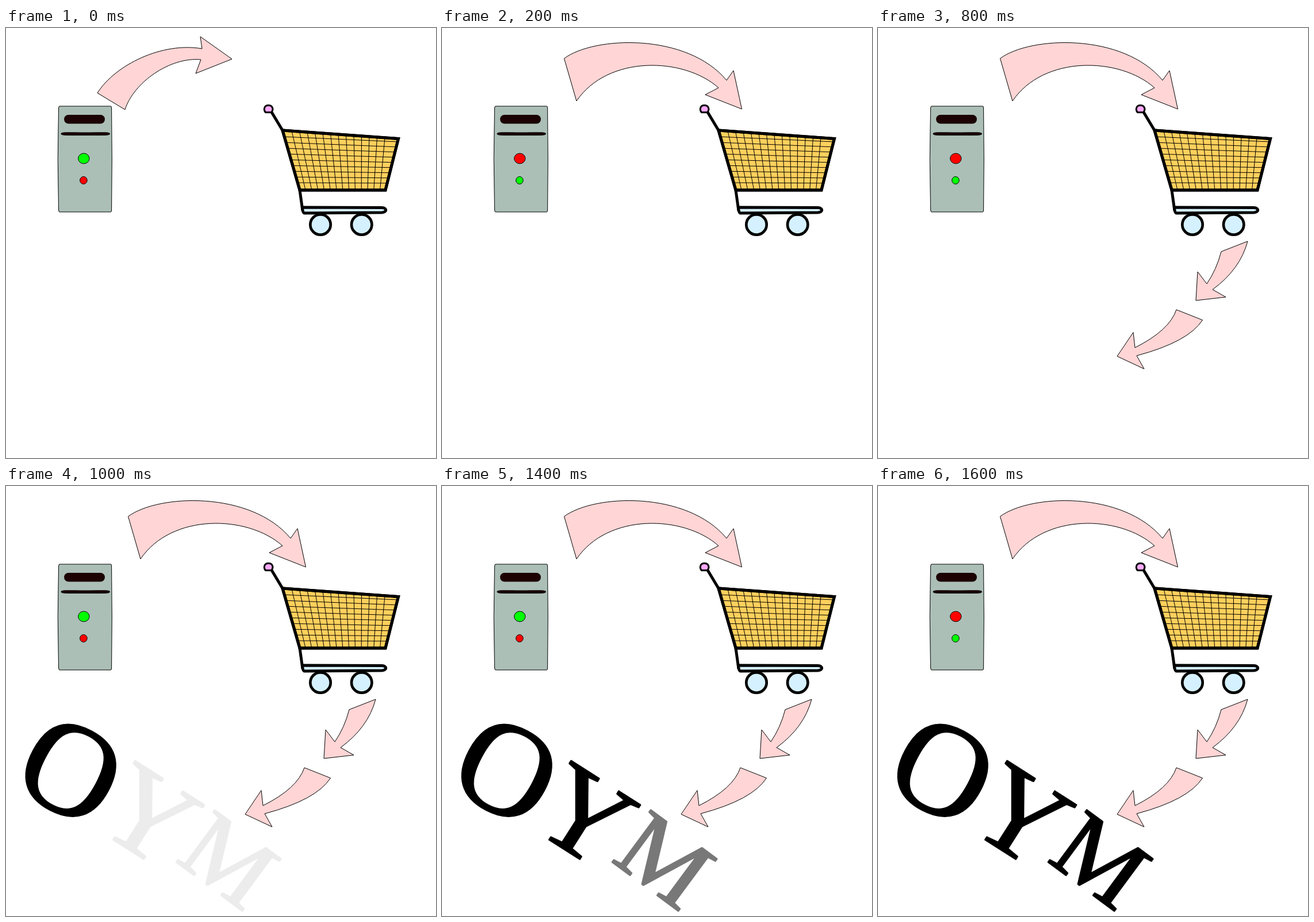
Recreate the animation shown at these times as an HTML page with a canvas. Size 748 by 748 pixels, loop 1800 ms.

```html
<!DOCTYPE html>
<html lang="en">
<head>
<meta charset="utf-8">
<title>Server, cart and letters</title>
<style>
html, body { margin: 0; width: 100%; height: 100%; overflow: hidden; background: #fff; }
canvas { display: block; }
</style>
</head>
<body>
<canvas id="stage" width="748" height="748"></canvas>
<script>
const ctx = document.getElementById('stage').getContext('2d');
const LOOP = 1800;
const PINK = '#ffd5d5', ICE = '#d5f1ff', RED = '#ff0000', GREEN = '#00ff00';
const GHOST = '#ececec', GREY = '#787878', BLACK = '#000';

const ARROWS = {
  rise: 'M159 113C190 64 272 24 341 36L338 15 393 54 330 79 339 55C285 50 222 95 207 142Z',
  toCart: 'M212.5 53C265 14 426 8 495 91L507 74 521.5 141 458 116 481 104C420 50 288 47 234 127Z',
  down: 'M643 371L597 389Q589 420 572 445L556 424 553 474 605 468 582 455Q630 420 643 371Z',
  left: 'M519 490L564.5 508Q540 546 450 570L463 593 416 571 444 529.5 447 556Q507 526 519 490Z'
};

// One letter per place: ink centre, tilt in degrees, font size
const LETTERS = [
  { char: 'O', x: 113, y: 494, tilt: 28, size: 230 },
  { char: 'Y', x: 248, y: 574, tilt: 32.5, size: 208 },
  { char: 'M', x: 387, y: 651, tilt: 36.5, size: 172 }
];

function shape(d, fill, width = 1) {
  const path = new Path2D(d);
  if (fill) {
    ctx.fillStyle = fill;
    ctx.fill(path);
  }
  ctx.lineWidth = width;
  ctx.strokeStyle = BLACK;
  ctx.stroke(path);
}

function oval(x, y, rx, ry, fill, width = 1) {
  ctx.beginPath();
  ctx.ellipse(x, y, rx, ry, 0, 0, Math.PI * 2);
  ctx.fillStyle = fill;
  ctx.fill();
  ctx.lineWidth = width;
  ctx.strokeStyle = BLACK;
  ctx.stroke();
}

function drawServer(big, small) {
  shape('M93 136H182.5Q183.5 136 183.6 140Q185 228 183.6 316Q183.5 320 182.5 320H93Q91.7 320 91.5 316Q89 228 91.5 140Q91.7 136 93 136Z', '#abbfb7');
  ctx.fillStyle = '#1c0202';
  ctx.beginPath();
  ctx.roundRect(101, 151, 71, 15.5, 7.7);
  ctx.fill();
  shape('M96 184C96 181 104 182 138 182S180.5 181 180.5 184S172 186.5 138 186.5S96 187 96 184Z', '#1c0202');
  oval(135.3, 227, 9.7, 9, big);
  oval(134.9, 265, 6.3, 6.5, small);
}

// Wires flatten towards the floor of the basket and lean in towards its middle
function drawWires(basket) {
  ctx.save();
  ctx.clip(new Path2D(basket));
  for (let i = 0; i < 9; i++) {
    const y = 189 + 10 * i;
    shape(`M481 ${y}L683 ${y + 9 - i}`);
  }
  for (let i = 0; i < 13; i++) {
    shape(`M${497 + 13.5 * i} ${179 + i}L${521 + 10.8 * i} 282`);
  }
  ctx.restore();
}

function drawCart() {
  const basket = 'M481 178L682.5 192.5 660 282 511 282Z';
  shape('M460 143L481 178', null, 5);
  shape('M451.5 146.8C447.5 142 449 134.5 456.5 134.5S466 142 461.5 146.8Z', '#ffaaff', 3);
  shape('M511 282L516 318', null, 5);
  shape('M515.5 312L654 312.5C663 313 663 320.5 654 321L519 322Q516 322 515.5 312Z', ICE, 5);
  shape(basket, '#ffd05c', 5);
  drawWires(basket);
  shape(basket, null, 5);
  oval(547, 342, 17.7, 17.7, ICE, 4.7);
  oval(618.7, 342, 17.7, 17.7, ICE, 4.7);
}

function drawLetter({ char, x, y, tilt, size }, color) {
  ctx.save();
  ctx.translate(x, y);
  ctx.rotate(tilt * Math.PI / 180);
  ctx.font = `${size}px "Liberation Serif", serif`;
  const m = ctx.measureText(char);
  const left = (m.actualBoundingBoxLeft - m.actualBoundingBoxRight) / 2;
  const base = (m.actualBoundingBoxAscent - m.actualBoundingBoxDescent) / 2;
  ctx.fillStyle = ctx.strokeStyle = color;
  ctx.lineWidth = 3;
  ctx.lineJoin = 'round';
  ctx.fillText(char, left, base);
  ctx.strokeText(char, left, base);
  ctx.restore();
}

function letterColors(t) {
  if (t < 1000) return [];
  if (t < 1200) return [BLACK, GHOST, GHOST];
  if (t < 1400) return [BLACK, GREY, GHOST];
  if (t < 1600) return [BLACK, BLACK, GREY];
  return [BLACK, BLACK, BLACK];
}

function draw(t) {
  ctx.fillStyle = '#fff';
  ctx.fillRect(0, 0, 748, 748);
  const ready = t < 200 || (t >= 1000 && t < 1600);
  drawServer(ready ? GREEN : RED, ready ? RED : GREEN);
  drawCart();
  letterColors(t).forEach((color, i) => drawLetter(LETTERS[i], color));
  shape(t < 200 ? ARROWS.rise : ARROWS.toCart, PINK);
  if (t >= 600) shape(ARROWS.down, PINK);
  if (t >= 800) shape(ARROWS.left, PINK);
}

const start = performance.now();
function tick() {
  draw((performance.now() - start) % LOOP);
  requestAnimationFrame(tick);
}
tick();
</script>
</body>
</html>
```
